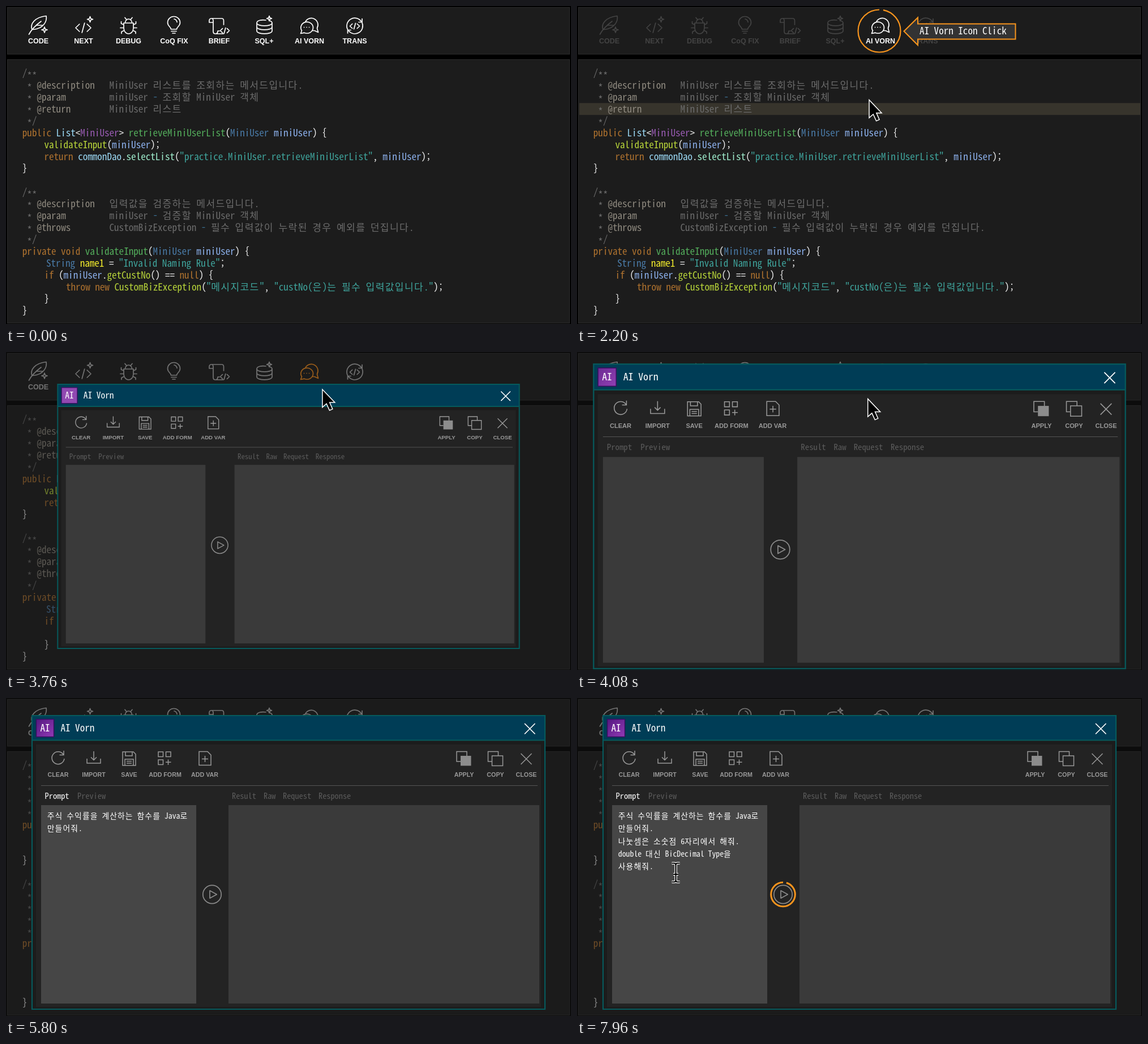
These frames come from a looping animation (998 by 561 pixels, 8 s). An HTML page:

```html
<!DOCTYPE html>
<html lang="ko">
<head>
<meta charset="utf-8">
<title>Code assistant</title>
<style>
html, body { margin: 0; width: 100%; height: 100%; overflow: hidden; background: #000; }
svg { display: block; width: 100%; height: 100%; }
text { white-space: pre; font-family: "Noto Sans Mono CJK KR", "Noto Sans Mono CJK JP", "Noto Sans CJK KR", "Noto Sans Mono", monospace; font-size: 17.08px; fill: #fff; }
.wide { letter-spacing: .08em; }
.low { baseline-shift: -.22em; }
.label { font: bold 12.5px "Liberation Sans", Arial, sans-serif; text-anchor: middle; fill: currentColor; }
.small { font-size: 10.7px; }
.icon { fill: none; stroke: currentColor; stroke-width: 1.7; stroke-linecap: round; stroke-linejoin: round; }
.thin { stroke-width: 1.5; stroke-linecap: butt; stroke-linejoin: miter; }
.tab { font-size: 14.3px; fill: #5b5b5b; }
.prompt { font-size: 13.8px; }
.ring { fill: none; stroke: #f7941d; }
</style>
</head>
<body>
<svg viewBox="0 0 998 561">
  <defs>
    <linearGradient id="violet" x2="1" y2="1">
      <stop stop-color="#54187f"/><stop offset="1" stop-color="#923ab6"/>
    </linearGradient>
  </defs>
  <rect width="998" height="561"/>
  <g fill="#1c1c1c" stroke="#2c2c2c">
    <rect x="2.5" y="2.5" width="993" height="82.5"/>
    <rect x="2.5" y="94.5" width="993" height="465"/>
  </g>
  <rect id="row" x="4" width="991" height="21" fill="#37342c"/>
  <g id="code"></g>
  <g id="tools"></g>
  <circle id="ring" class="ring" cx="534" cy="44" stroke-width="2.2" pathLength="100" transform="matrix(-1 0 0 1 1068 0) rotate(-90 534 44)"/>
  <g id="callout">
    <path d="M577.5 44.5 602 20.5V31.5H774.5V58.5H602V69Z" fill="#333" stroke="#f7941d" stroke-width="2"/>
    <text x="605" y="50.2">AI Vorn Icon Click</text>
  </g>
  <rect id="veil" width="998" height="561" fill="#1c1c1c"/>
  <g id="win">
    <rect x="46" y="31" width="906" height="518" fill="#1c1c1c"/>
    <rect x="53" y="82" width="892" height="463" fill="#232323"/>
    <path d="M46 31H952V75H46Z" fill="#003d56"/>
    <path d="M46 31H952V549H46ZM46 74.5H952" fill="none" stroke="#065a5c" stroke-width="2.2"/>
    <rect x="53.5" y="37.5" width="31" height="31" fill="url(#violet)"/>
    <rect id="gloss" x="53.5" y="37.5" width="31" height="31" fill="#9149b1"/>
    <rect x="53.5" y="37.5" width="31" height="31" fill="none" stroke="#3b0e60" stroke-width="1.5"/>
    <text x="60.4" y="59">AI</text>
    <text x="96.5" y="59">AI Vorn</text>
    <path d="M916 45 934.5 63.5M934.5 45 916 63.5" stroke="#fff" stroke-width="1.7"/>
    <g id="actions" color="#999"></g>
    <path d="M62 154.5H939" stroke="#555"/>
    <g id="tabs"></g>
    <rect id="input" x="62" y="189" width="274" height="350"/>
    <rect x="393" y="189" width="549" height="350" fill="#3a3a3a"/>
    <g class="icon" color="#8a8a8a"><circle cx="364" cy="346.5" r="16.2"/><path d="M360 339.8 372.3 346.5 360 353.2Z"/></g>
    <g id="prompt"></g>
  </g>
  <circle id="runRing" class="ring" cx="364" cy="346.5" pathLength="100" transform="matrix(-1 0 0 1 728 0) rotate(-90 364 346.5)"/>
  <path id="arrow" d="M0 0V31.5L7.2 25.2 12.6 37 18 34.6 12.8 23H22Z" stroke="#fff" stroke-width="1.5"/>
  <g id="beam" fill="none">
    <path d="M-7-16.5H-3Q0-16.5 0-13.5Q0-16.5 3-16.5H7M0-13.5V13.5M-7 16.5H-3Q0 16.5 0 13.5Q0 16.5 3 16.5H7M-4.5 3H4.5" stroke="#fff" stroke-width="4.6"/>
    <path d="M-7-16.5H-3Q0-16.5 0-13.5Q0-16.5 3-16.5H7M0-13.5V13.5M-7 16.5H-3Q0 16.5 0 13.5Q0 16.5 3 16.5H7M-4.5 3H4.5" stroke="#000" stroke-width="2.2"/>
  </g>
</svg>
<script>
const LOOP = 8000;
const $ = id => document.getElementById(id);
const escapeText = s => s.replace(/&/g, '&amp;').replace(/</g, '&lt;');
// Hangul fills two columns of the character grid; asterisks sit at mid height.
const markup = s => escapeText(s)
  .replace(/[가-힣]+/g, '<tspan class="wide">$&</tspan>')
  .replace(/\*+/g, '<tspan class="low">$&</tspan>');
const star = (x, y, r) => {
  const q = r * 0.25;
  return `M${x} ${y - r}L${x + q} ${y - q} ${x + r} ${y} ${x + q} ${y + q} ${x} ${y + r} ${x - q} ${y + q} ${x - r} ${y} ${x - q} ${y - q}Z`;
};
const chevrons = (x, y, w, h) =>
  `M${x - w * .5} ${y - h}L${x - w} ${y}L${x - w * .5} ${y + h}M${x + w * .5} ${y - h}L${x + w} ${y}L${x + w * .5} ${y + h}M${x + w * .17} ${y - h * 1.3}L${x - w * .17} ${y + h * 1.3}`;

// Code listing: "~x" switches to the colour named x.
const ink = {
  d: '#6c6c6c', t: '#908b80', h: '#3b6f92', k: '#b0732f', c: '#9bd9f5', w: '#f2f2f2', g: '#9a5cb4',
  m: '#54ae5c', p: '#4a7ba8', v: '#8db2ee', f: '#b9d63a', a: '#a0efcf', s: '#3fa59d', y: '#f6ef2c'
};
const listing = [
  '~d/**',
  '~d * ~t@description~d   MiniUser 리스트를 조회하는 메서드입니다.',
  '~d * ~t@param~d         miniUser ~h-~d 조회할 MiniUser 객체',
  '~d * ~t@return~d        MiniUser 리스트',
  '~d */',
  '~kpublic ~cList~w<~gMiniUser~w> ~mretrieveMiniUserList~w(~pMiniUser ~vminiUser~w) {',
  '\t~fvalidateInput~w(~vminiUser~w);',
  '\t~kreturn ~ccommonDao~w.~aselectList~w(~s"practice.MiniUser.retrieveMiniUserList"~w, ~vminiUser~w);',
  '~w}',
  '',
  '~d/**',
  '~d * ~t@description~d   입력값을 검증하는 메서드입니다.',
  '~d * ~t@param~d         miniUser ~h-~d 검증할 MiniUser 객체',
  '~d * ~t@throws~d        CustomBizException ~h-~d 필수 입력값이 누락된 경우 예외를 던집니다.',
  '~d */',
  '~kprivate void ~mvalidateInput~w(~pMiniUser ~vminiUser~w) {',
  '\t~pString ~yname1 ~w= ~s"Invalid Naming Rule"~w;',
  '\t~kif ~w(~vminiUser~w.~fgetCustNo~w() == ~knull~w) {',
  '\t\t~kthrow new ~fCustomBizException~w(~s"메시지코드"~w, ~s"custNo(은)는 필수 입력값입니다."~w);',
  '\t~w}',
  '~w}'
];
const PITCH = 20.97;
$('code').innerHTML = listing.map((line, i) => {
  const tabs = line.lastIndexOf('\t') + 1;
  const x = 28.8 + tabs * 38.6 + (line.includes('~pString') ? 3.5 : 0);
  const spans = line.slice(tabs).split('~').slice(1)
    .map(part => `<tspan fill="${ink[part[0]]}">${markup(part.slice(1))}</tspan>`).join('');
  return `<text x="${x}" y="${124.8 + i * PITCH}">${spans}</text>`;
}).join('');

// Main toolbar
const tools = [
  ['CODE', 57, 'M40.5 50Q47 38 62 27M46 42C42 31 51 20 71 17.5C73 27 66 40 48 41.5M54 34H65' + star(68, 42, 5)],
  ['NEXT', 137, chevrons(136.5, 38.5, 13.5, 6.5) + star(148.5, 23.5, 5)],
  ['DEBUG', 216.5, 'M208 30H225V39A8.5 10 0 0 1 208 39ZM210.5 30A6 7 0 0 1 222.5 30M212.5 23.5 210 20.5M220.5 23.5 223 20.5M208 33 203.5 31V27.5M225 33 229.5 31V27.5M208 38.5H202M225 38.5H231M209 43 204 45.5V48.5M224 43 229 45.5V48.5'],
  ['CoQ FIX', 297, 'M291.5 41C291.5 37 285.5 35.5 285.5 29.5A11 11 0 0 1 307.5 29.5C307.5 35.5 301.5 37 301.5 41ZM292 44.5H301M294 48H299M297 23Q301.5 24 302 28.5'],
  ['BRIEF', 376.5, 'M366 29H359V26Q359 22 363 22H381Q384.5 22 384.5 26V33M363 22Q366 22 366 26V45Q366 49 370 49H384M370 49Q374 49 374 44H377' + chevrons(386.5, 43.5, 8, 3.8)],
  ['SQL+', 456, 'M466 26Q470 27.5 470 30C470 36.5 443 36.5 443 30C443 25 452 24 459 25M443 30V44C443 50.5 470 50.5 470 44V30M443 37C443 43.5 470 43.5 470 37' + star(465, 22, 4.5)],
  ['AI VORN', 536, 'M520.5 48.5 522.5 43.5A10.8 10 0 1 1 527 47.2ZM529 27.5A11.2 11.2 0 1 1 549.5 39L551.5 46.5 545 43.5H541M526.5 37.5H526.6M531 37.5H531.1M535.5 37.5H535.6'],
  ['TRANS', 616, 'M604 42.5A14 14 0 0 1 628 28M629 22.5V28.5H623M629 29.5A14 14 0 0 1 605 43.5M603.5 48V42.5H609' + chevrons(616, 35.5, 8.5, 4)]
];
$('tools').innerHTML = tools.map(([name, x, d]) =>
  `<g color="#fff"><path class="icon" d="${d}"/><text class="label" x="${x}" y="66.3">${name}</text></g>`).join('');
const toolGroups = [...$('tools').children];
const mainTool = toolGroups[6];

// Dialog toolbar, tabs and prompt
const actions = [
  ['CLEAR', 92, 'M101.5 100A11 11 0 1 0 103 107M102 93V100.5H94.5'],
  ['IMPORT', 155, 'M143 107V115H167V107M155 94V109M150 104.5 155 109.5 160 104.5'],
  ['SAVE', 217.5, 'M206 95H225L229 99V119H206ZM211 95V102H223V95M210 119V108H225V119M213 111.5H222M213 115H222'],
  ['ADD FORM', 281, 'M269 95H277.5V103.5H269ZM282.5 95H291V103.5H282.5ZM269 109H277.5V117.5H269ZM286.5 108.5V118M282 113.3H291.5'],
  ['ADD VAR', 351, 'M341 94.5H356L362 100.5V118.5H341ZM351.5 102V113M346 107.5H357'],
  ['APPLY', 809, 'M803 112H796V94.5H814V102'],
  ['COPY', 864.5, 'M858 112H851.5V94.5H869.5V102M858.5 102H877.5V119.5H858.5Z'],
  ['CLOSE', 919, 'M909.5 98 928.5 117M928.5 98 909.5 117']
];
$('actions').innerHTML = actions.map(([name, x, d]) =>
  `<path class="icon thin" d="${d}"/><text class="label small" x="${x}" y="139.4">${name}</text>`).join('') +
  '<rect x="803" y="102" width="18.5" height="17.5" fill="#8c8c8c"/>';

const tabs = [['Prompt', 68.6], ['Preview', 126], ['Result', 399], ['Raw', 455], ['Request', 489], ['Response', 552]];
$('tabs').innerHTML = tabs.map(([name, x]) => `<text class="tab" x="${x}" y="177.6">${name}</text>`).join('');

const promptLines = [
  '주식 수익률을 계산하는 함수를 Java로', '만들어줘.', '나눗셈은 소숫점 6자리에서 해줘.',
  'double 대신 BicDecimal Type을', '사용해줘.'
];
$('prompt').innerHTML = promptLines.map((_, i) =>
  `<text class="prompt" x="72.8" y="${213 + i * 22.35}"></text>`).join('');
const promptTexts = [...$('prompt').children];

// Interpolates a table of [time, value, value...] rows.
const smooth = p => p * p * (3 - 2 * p);
const linear = p => p;
function at(t, keys, ease = linear) {
  const next = keys.findIndex(k => k[0] > t);
  if (next === 0) return keys[0].slice(1);
  if (next < 0) return keys[keys.length - 1].slice(1);
  const a = keys[next - 1], b = keys[next];
  const p = ease((t - a[0]) / (b[0] - a[0]));
  return a.slice(1).map((v, i) => v + (b[i + 1] - v) * p);
}
const show = (el, on) => { el.style.display = on ? '' : 'none'; };
const fade = (el, t, keys) => {
  const [o] = at(t, keys);
  el.style.opacity = o;
  show(el, o > 0);
};
const move = (el, [x, y]) => el.setAttribute('transform', `translate(${x} ${y})`);
const rgb = values => `rgb(${values.map(Math.round)})`;

const pointer = [[1800, 975, 294], [2200, 516, 166], [2600, 541, 59], [3480, 541, 59], [3760, 559, 66], [4320, 480, 95], [4840, 124, 193], [5000, 108, 196]];
const dialogScale = [[3480, .5], [3760, .9], [3960, 1.05], [4320, 1]];
const typed = [[5200, 0], [6760, 71.2], [7000, 76]];

function draw(t) {
  const [dim] = at(t, [[960, 1], [1320, .35], [1640, .17], [2640, .17], [3000, .7]]);
  toolGroups.forEach(g => { if (g !== mainTool) g.style.opacity = dim; });
  mainTool.style.color = rgb(at(t, [[2640, 255, 255, 255], [2960, 255, 145, 25], [4320, 255, 145, 25], [4900, 187, 187, 187]]));

  fade($('callout'), t, [[960, 0], [1200, 1], [2280, 1], [2560, 0]]);
  move($('callout'), [...at(t, [[960, 110], [1320, 28], [1480, 7], [1640, 0]]), 0]);

  fade($('ring'), t, [[1800, 0], [1840, 1], [2640, 1], [2920, 0]]);
  $('ring').setAttribute('r', at(t, [[1800, 39], [2200, 37.5]])[0]);
  $('ring').setAttribute('stroke-dasharray', `${at(t, [[1800, 0], [2200, 97], [2280, 100]])[0]} 100`);

  const [px, py] = at(t, pointer);
  const row = Math.floor((py + 18 - 108.3) / PITCH);
  show($('row'), t >= 1800 && t < 2600 && row >= 0);
  $('row').setAttribute('y', 108.3 + row * PITCH);
  move($('arrow'), [px, py]);
  show($('arrow'), t >= 1600 && t < 5240);

  fade($('veil'), t, [[3480, 0], [3720, .45]]);
  fade($('win'), t, [[3480, 0], [3640, 1]]);
  $('win').setAttribute('transform', `translate(499 290) scale(${at(t, dialogScale, smooth)[0]}) translate(-499 -290)`);
  fade($('gloss'), t, [[3760, 1], [4280, 0]]);
  const [tone] = at(t, [[4400, 58], [4760, 70]]);
  $('input').setAttribute('fill', rgb([tone, tone, tone]));
  const [tab] = at(t, [[5200, 91], [5360, 255]]);
  $('tabs').firstChild.style.fill = rgb([tab, tab, tab]);

  let left = Math.floor(at(t, typed)[0]);
  promptLines.forEach((line, i) => {
    promptTexts[i].innerHTML = markup(line.slice(0, Math.max(0, left)));
    left -= line.length;
  });

  fade($('runRing'), t, [[6600, 0], [6680, 1]]);
  $('runRing').setAttribute('r', at(t, [[6640, 34], [6760, 29.6], [6880, 26], [7080, 22.6], [7280, 21.3]])[0]);
  $('runRing').setAttribute('stroke-width', at(t, [[6760, 2.2], [7280, 3]])[0]);
  $('runRing').setAttribute('stroke-dasharray', `${at(t, [[6880, 100], [7280, 80], [7480, 80], [7960, 95.5]])[0]} 100`);

  show($('beam'), t >= 5240 && t < 5440 || t >= 7480);
  move($('beam'), t < 6000 ? [72, 211] : at(t, [[7480, 136, 297], [7960, 174.5, 308]], smooth));
}

const start = performance.now();
function tick() {
  draw((performance.now() - start) % LOOP);
  requestAnimationFrame(tick);
}
tick();
</script>
</body>
</html>
```
